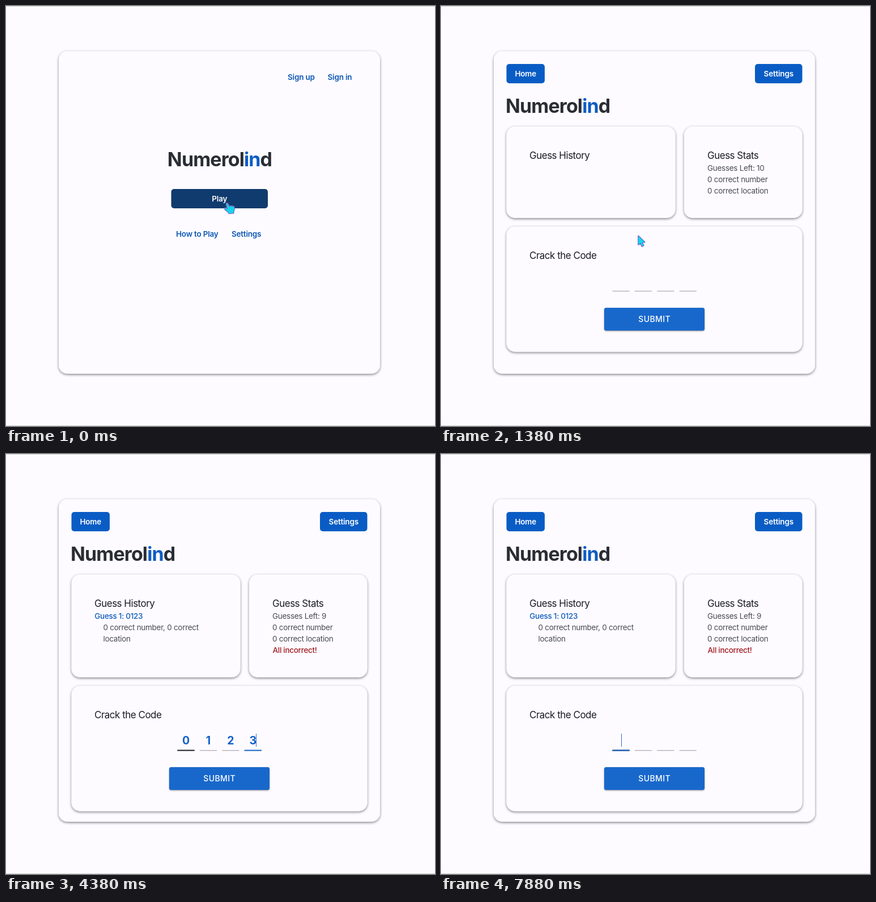
Recreate the animation shown at these times as an HTML page with a canvas. Size 757 px wide and 739 px high, loop 8 s.

```html
<!DOCTYPE html>
<html lang="en">
<head>
<meta charset="utf-8">
<title>Numerolind</title>
<style>
html, body { margin: 0; width: 100%; height: 100%; overflow: hidden; background: #fdfbff; }
canvas { display: block; }
</style>
</head>
<body>
<canvas id="stage" width="757" height="739"></canvas>
<script>
const ctx = document.getElementById('stage').getContext('2d');
const LOOP = 8000, PLAY_AT = 130, MOVE_FROM = 1000, MOVE_TO = 1875, GUESS_AT = 4380;
const BLUE = '#0a5cc5', INK = '#1c1d21', GREY = '#494b51', PAPER = '#fdfbff';

// [time, focused field, entered digits]
const STEPS = [
  [2130, 0, ''],
  [3000, 1, '0'], [3250, 2, '01'], [3630, 3, '012'], [4000, 3, '0123'],
  [6000, 2, '012'], [6250, 1, '01'], [6500, 0, '0'], [6880, 0, '']
];

const STYLES = {
  title:  { size: 34,   weight: 700, gap: -0.9 },
  link:   { size: 13.5, weight: 600, gap: -0.2 },
  head:   { size: 17,   weight: 400, gap: -0.5 },
  body:   { size: 13.5, weight: 400, gap: -0.29 },
  note:   { size: 13.5, weight: 500, gap: -0.29 },
  submit: { size: 14,   weight: 500, gap: 0.4 },
  digit:  { size: 19.5, weight: 700, gap: 0 }
};

function setFont(name) {
  const s = STYLES[name];
  ctx.font = `${s.weight} ${s.size}px Inter, "Open Sans", sans-serif`;
  ctx.letterSpacing = s.gap + 'px';
}

function text(str, x, y, style, color, align = 'left') {
  setFont(style);
  ctx.textAlign = align;
  ctx.fillStyle = color;
  ctx.fillText(str, x, y);
}

function box(x, y, w, h, r, color) {
  ctx.beginPath();
  ctx.roundRect(x, y, w, h, r);
  ctx.fillStyle = color;
  ctx.fill();
}

function shadowBox(x, y, w, h, r, color, shadows) {
  for (const [dy, blur, alpha] of shadows) {
    ctx.save();
    ctx.shadowColor = `rgba(0,0,0,${alpha})`;
    ctx.shadowBlur = blur;
    ctx.shadowOffsetY = dy;
    box(x, y, w, h, r, color);
    ctx.restore();
  }
}

function card(x, y, w, h) {
  shadowBox(x, y, w, h, 15, PAPER, [[2, 4, 0.34], [1, 5, 0.16]]);
}

function button(label, x, y, w, color = BLUE) {
  box(x, y, w, 34, 5, color);
  text(label, x + w / 2, y + 22, 'link', '#fff', 'center');
}

function title(x, y, centered) {
  const parts = [['Numerol', '#2a2d34'], ['in', BLUE], ['d', '#2a2d34']];
  setFont('title');
  const widths = parts.map(p => ctx.measureText(p[0]).width);
  if (centered) x -= widths.reduce((a, b) => a + b) / 2;
  parts.forEach(([str, color], i) => {
    text(str, x, y, 'title', color);
    x += widths[i];
  });
}

function drawHome() {
  const link = '#0d57b3';
  text('Sign up', 497, 130, 'link', link);
  text('Sign in', 567.5, 130, 'link', link);
  title(377, 282, true);
  button('Play', 291.5, 322, 170.5, '#103b6e');
  text('How to Play', 300, 406, 'link', link);
  text('Settings', 398, 406, 'link', link);
}

function entry(t) {
  let i = -1;
  while (i + 1 < STEPS.length && STEPS[i + 1][0] <= t) i++;
  if (i < 0) return { field: -1, digits: '' };
  const [at, field, digits] = STEPS[i];
  const since = i > 0 && STEPS[i - 1][1] === field ? STEPS[i - 1][0] : at;
  return { field, digits, caret: (t - at) % 1000 < 500, grow: Math.min(1, (t - since) / 200) };
}

function drawFields(t, y, hover) {
  const { field, digits, caret, grow } = entry(t);
  for (let i = 0; i < 4; i++) {
    const x = 302.4 + i * 39.4, w = 30.3, mid = x + w / 2;
    if (i === 0 && hover) box(x, y + 500.5, w, 2, 0, INK);
    else box(x, y + 501.2, w, 1, 0, '#99989d');
    if (digits[i]) text(digits[i], mid, y + 490.5, 'digit', '#1261c9', 'center');
    if (i !== field) continue;
    const e = 1 - (1 - grow) ** 3;
    box(mid - w * e / 2, y + 500.5, w * e, 2, 0, '#1767cd');
    if (caret) box(Math.round(mid + (digits[i] ? 5.3 : 0)), y + 472, 1, 23, 0, '#2e6fc4');
  }
}

function drawGame(t, hover) {
  const done = t >= GUESS_AT, drop = done ? 20 : 0;
  button('Home', 115.5, 102, 67.5);
  button('Settings', 554, 102, 83.5);
  title(114, 187.5);

  card(115.5, 212, 298, 161 + drop);
  text('Guess History', 156, 269, 'head', INK);
  if (done) {
    text('Guess 1: 0123', 156.3, 290.3, 'note', '#0e5abd');
    text('0 correct number, 0 correct', 171.5, 310.3, 'body', GREY);
    text('location', 171.5, 330, 'body', GREY);
  }

  card(429, 212, 208.5, 161 + drop);
  text('Guess Stats', 470, 269, 'head', INK);
  text('Guesses Left: ' + (done ? 9 : 10), 470, 290.3, 'body', GREY);
  text('0 correct number', 470, 310.3, 'body', GREY);
  text('0 correct location', 470, 330, 'body', GREY);
  if (done) text('All incorrect!', 470.5, 350, 'note', '#a21c20');

  card(115.5, 388 + drop, 522, 220.5);
  text('Crack the Code', 156, 445 + drop, 'head', INK);
  drawFields(t, drop, hover);
  shadowBox(288, 531 + drop, 177, 40, 4, '#1868cc', [[1, 3, 0.3], [1, 2, 0.2]]);
  text('SUBMIT', 376.6, 555.6 + drop, 'submit', '#fff', 'center');
}

function shape(points, x, y) {
  ctx.beginPath();
  points.forEach(([px, py]) => ctx.lineTo(x + px, y + py));
  ctx.closePath();
  ctx.lineJoin = 'round';
  ctx.strokeStyle = '#d88be0';
  ctx.lineWidth = 2.4;
  ctx.stroke();
  ctx.strokeStyle = '#4a4fb8';
  ctx.lineWidth = 1.2;
  ctx.stroke();
  ctx.fillStyle = '#16d5ea';
  ctx.fill();
}

const ARROW = [[0.5, 1], [0.5, 16.5], [4, 13.5], [6.8, 19.5], [9.8, 18], [7.2, 12.5], [11.8, 12]];
const HAND = [[0, 1], [1.8, 0.5], [5, 6.5], [7, 5.2], [8.5, 6], [10, 5.2], [11.5, 6.2], [13, 6.2],
  [14, 11], [12.5, 14], [12.5, 17.5], [4.5, 18], [2.5, 15], [-2.8, 11], [-2.5, 9], [2, 10.5]];

function beam(x, y) {
  ctx.lineCap = 'round';
  for (const [color, width] of [['#d88be0', 5], ['#4a4fb8', 3.8], ['#16d5ea', 2.4]]) {
    ctx.beginPath();
    for (const s of [-1, 1]) {
      ctx.moveTo(x - 4, y + 8.5 * s);
      ctx.quadraticCurveTo(x, y + 8.5 * s, x, y + 5 * s);
      ctx.quadraticCurveTo(x, y + 8.5 * s, x + 4, y + 8.5 * s);
    }
    ctx.moveTo(x, y - 6);
    ctx.lineTo(x, y + 6);
    ctx.moveTo(x - 1.5, y + 2.5);
    ctx.lineTo(x + 1.5, y + 2.5);
    ctx.strokeStyle = color;
    ctx.lineWidth = width;
    ctx.stroke();
  }
}

function pointer(t) {
  const k = Math.max(0, Math.min(1, (t - MOVE_FROM) / (MOVE_TO - MOVE_FROM)));
  const s = k * k * (3 - 2 * k);
  return { x: 388 - 62.5 * (1 - (1 - s) ** 2), y: 346 + 142.5 * s };
}

function draw(t) {
  box(0, 0, 757, 739, 0, PAPER);
  box(0, 0, 757, 1, 0, '#d2d0d4');
  box(0, 738, 757, 1, 0, '#d2d0d4');
  card(93, 79.5, 567, 567.5);
  if (t < PLAY_AT) {
    drawHome();
    shape(HAND, 389, 347);
    return;
  }
  const p = pointer(t), hover = p.y > 474;
  drawGame(t, hover);
  if (t >= STEPS[1][0]) return;
  if (hover) beam(p.x, p.y);
  else shape(ARROW, p.x, p.y);
}

const start = performance.now();
function tick() {
  draw((performance.now() - start) % LOOP);
  requestAnimationFrame(tick);
}
tick();
</script>
</body>
</html>
```
